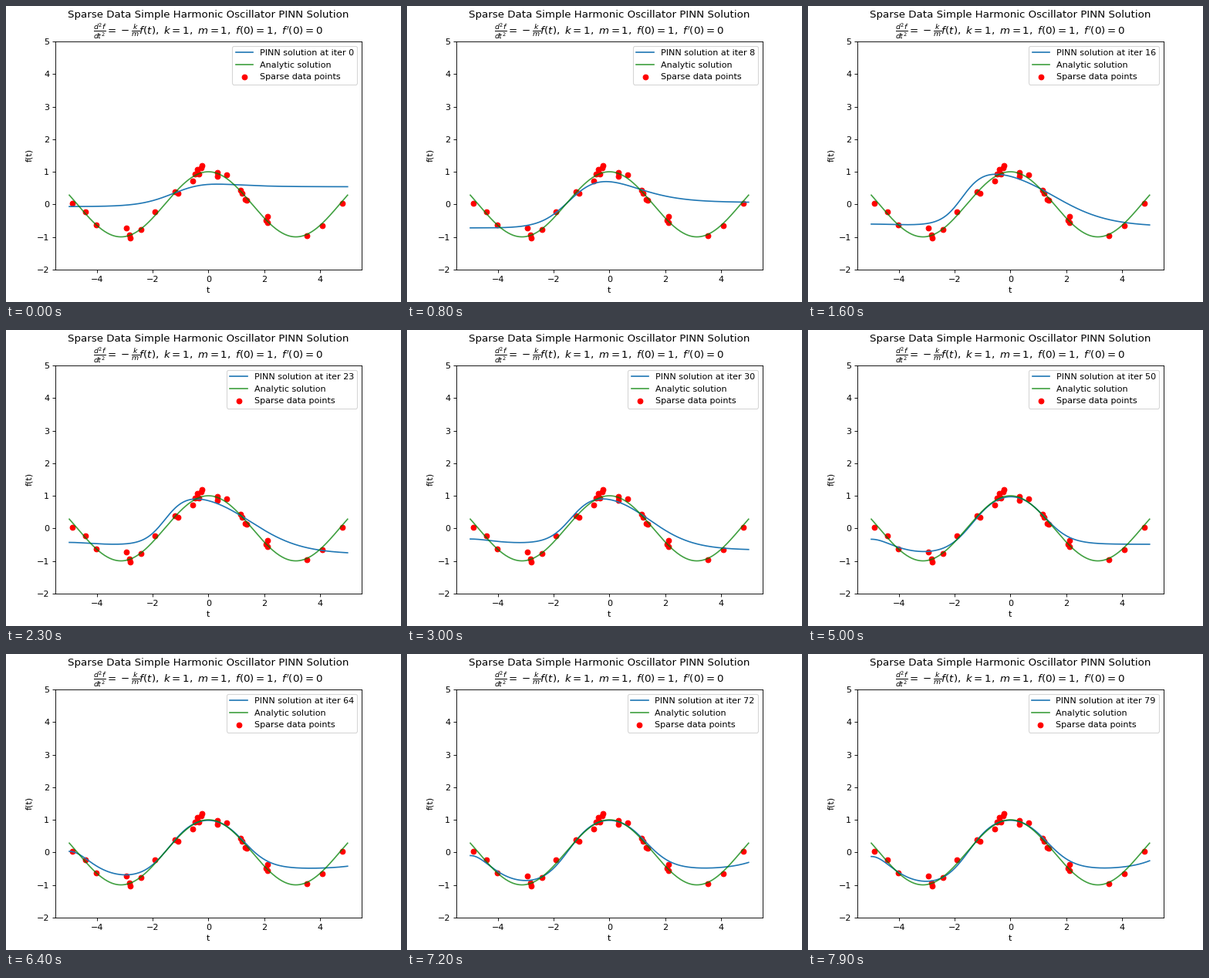
Write a matplotlib script that moves like this. It is 512x384 px and loops after 8000 ms.

```python
import numpy as np
import matplotlib.pyplot as plt
from matplotlib.animation import FuncAnimation

FRAMES = 80
STEP_MS = 100
TOP = 1.2

# Noisy observations (t, f)
POINTS = np.array([
    (-4.89, .03), (-4.42, -.23), (-4.03, -.63), (-2.95, -.73), (-2.84, -.94),
    (-2.81, -1.03), (-2.42, -.77), (-1.92, -.23), (-1.19, .39), (-1.09, .34),
    (-.565, .72), (-.48, .93), (-.40, 1.07), (-.34, .93), (-.26, 1.13),
    (-.23, 1.18), (.33, .98), (.33, .86), (.655, .91), (1.16, .43),
    (1.195, .34), (1.32, .15), (1.375, .125), (2.08, -.49), (2.12, -.37),
    (2.12, -.56), (3.54, -.96), (4.09, -.65), (4.81, .03),
])


def sigmoid(x):
    return 1 / (1 + np.exp(-x))


def ease(i, *keys):
    """Smoothstep between (iteration, value) keys."""
    for (i0, v0), (i1, v1) in zip(keys, keys[1:]):
        if i <= i1:
            u = max(0, (i - i0) / (i1 - i0))
            return v0 + (v1 - v0) * u * u * (3 - 2 * u)
    return keys[-1][1]


def network(t, i):
    """Learned curve: two sigmoid flanks under a common top, plus edge tails."""
    left = ease(i, (0, 1.27), (8, 1.93), (28, 1.67), (50, 2.05),
                (57, 2.28), (64, 2.1), (71, 2.3), (79, 2.33))
    left_at = ease(i, (0, -1.1), (16, -1.73), (30, -1.38), (50, -1.35), (79, -1.49))
    left_width = ease(i, (0, .65), (18, .37), (50, .49))

    right = ease(i, (0, .66), (20, 2.03), (30, 1.87), (50, 1.69), (79, 1.75))
    right_at = ease(i, (0, -.3), (16, 1.55), (50, 1.23), (79, 1.31))
    right_width = ease(i, (0, .8), (16, .98), (50, .46), (79, .49))

    left_tail = min(1, (i / 66) ** 2.4) / np.cosh((t + 5) / .75)
    right_tail = ease(i, (55, 0), (79, .29)) * np.exp((t - 5) / .85)
    return (TOP - left * sigmoid((left_at - t) / left_width)
            - right * sigmoid((t - right_at) / right_width)
            + left_tail + right_tail)


t = np.linspace(-5, 5, 300)

fig, ax = plt.subplots(figsize=(6.4, 4.8), dpi=80)
net, = ax.plot(t, network(t, 0), label="PINN solution at iter 0")
ax.plot(t, np.cos(t), color="green", alpha=0.75, label="Analytic solution")
ax.scatter(*POINTS.T, color="red", label="Sparse data points")
ax.set(xlim=(-5.5, 5.5), ylim=(-2, 5), xlabel="t", ylabel="f(t)")
ax.set_title("Sparse Data Simple Harmonic Oscillator PINN Solution\n"
             r"$\frac{d^2f}{dt^2}=-\frac{k}{m}f(t),\ k=1,\ m=1,\ "
             r"f(0)=1,\ f'(0)=0$")
legend = ax.legend(loc="upper right")


def update(i):
    net.set_ydata(network(t, i))
    legend.get_texts()[0].set_text(f"PINN solution at iter {i}")
    return net, legend


anim = FuncAnimation(fig, update, frames=FRAMES, interval=STEP_MS, repeat=True)
plt.show()
```
